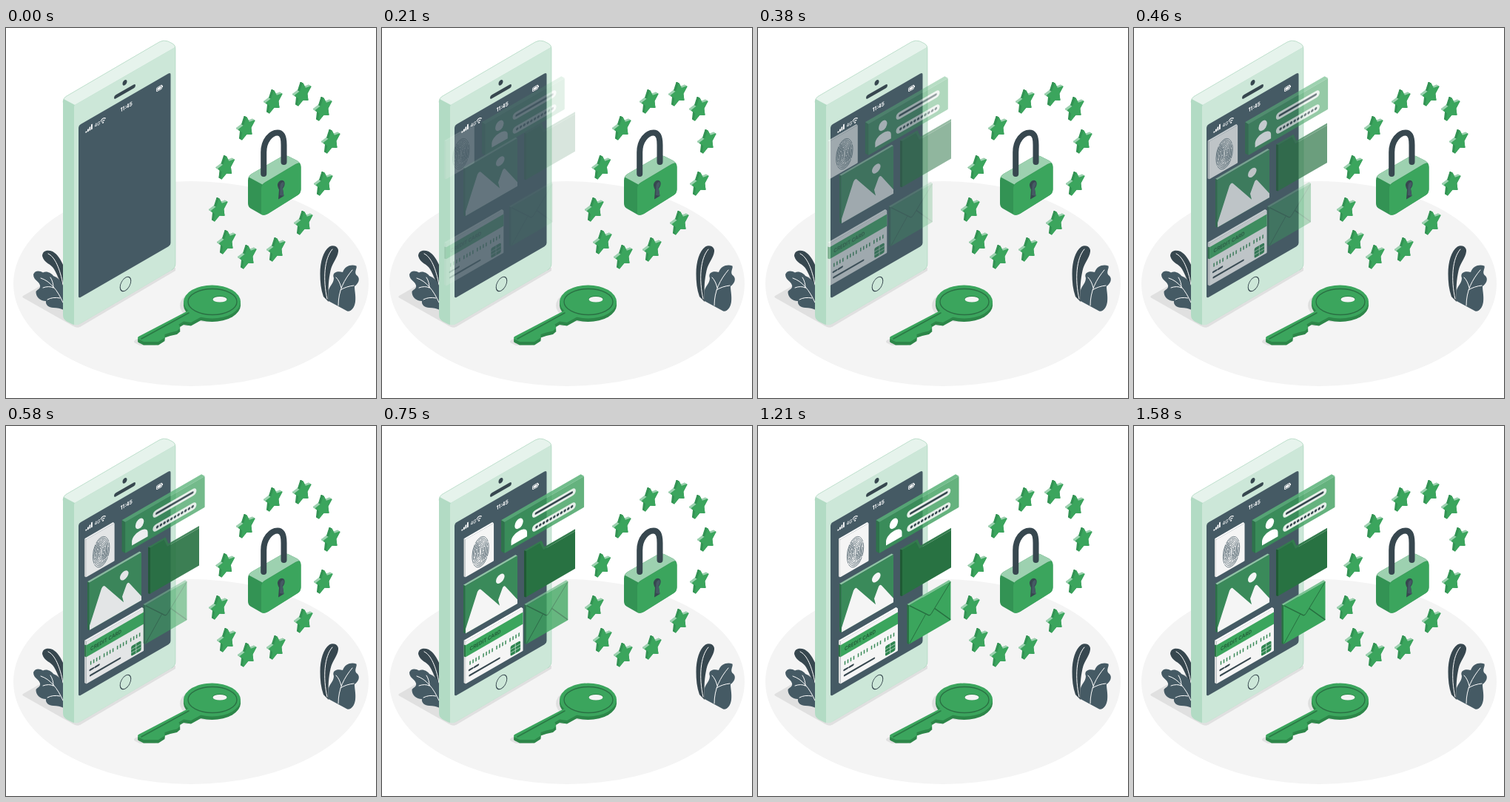
These frames come from a looping animation (500 by 500 pixels, 1.62 s). An HTML page:

```html
<!DOCTYPE html>
<html lang="en">
<head>
<meta charset="utf-8">
<title>Data protection</title>
<style>
  html, body { margin: 0; width: 100%; height: 100%; overflow: hidden; background: #fff; }
  svg { display: block; width: 100vw; height: 100vh; }
  .iso { transform: skewY(-30deg); transform-origin: 0 0; }
  .card { opacity: 0; }
  .line { fill: none; stroke-linecap: round; stroke-linejoin: round; }
  text { font-family: Inter, "Liberation Sans", Arial, sans-serif; font-weight: 700; }
</style>
</head>
<body>
<svg viewBox="0 0 500 500">
  <defs>
    <g id="star"></g>
    <path id="blade" d="M248 381 L179 417 Q177 419 179 420.500 L186 424 H206 L214.500 418.500 V414 L222 411.500 L231 409.500 L235.500 405.500 L233.500 400.500 L240 396.500 L250 398 L268 388Z"/>
    <g id="key"><ellipse cx="278.500" cy="370" rx="38.500" ry="22.500"/><use href="#blade"/></g>
  </defs>

  <ellipse cx="250" cy="345.500" rx="240" ry="138.500" fill="#f4f4f4"/>
  <path d="M23 362 L80 329 L229 324 V328 L100 404 Q96 406 91 403 L24 365 Q21 363.500 23 362Z" fill="#e0e0e0"/>

  <!-- plants -->
  <path d="M49 308 C49 301 56 299 63 302 C70 306 74 313 78 322 V354 C74 345 69 333 65 326 C62 319 51 318 49 308Z" fill="#37474f"/>
  <path d="M37 333 C39 327 46 328 50 330.500 C55 328 61 331 64 335 C70 337 76 343 78 350 V381 C74 379 69 378 64 378 C58 378 53 374 54 369 C46 369 40 363 40.500 356 C43 353 47 352 46 348 C45 342 37 341 37 333Z" fill="#455a64"/>
  <path d="M424.500 332 C424.500 316 429 301 437 295.500 C443 292 450 296 449 302 C448 311 441 317 438.500 328 C436 340 435 350 436 370 L429 363 C425.500 353 424.500 343 424.500 332Z" fill="#37474f"/>
  <path d="M435.500 358 C435 350 443 346 443 338 C440 330 448 328 455 330 C458 321 467 319 473.500 321.500 C475 325 469 331 475 335 C479 339 476 346 471 349 C471 355 473 362 472 370 C471 378 466 384 461 382.500 L436 369 Q435.500 364 435.500 358Z" fill="#455a64"/>
  <path class="line" stroke="#fff" d="M57 305 C66 309 73 325 77 347 M47 338 C60 342 70 355 77 371 M60 337 Q64 343 64 351 M50 351 Q58 348 64 351 M56 367 Q63 363 73 365 M441 299 C430 311 428 340 434 366 M449 375 C449 355 457 340 468 327 M446 337 Q451 342 453 351 M452 354 Q460 349 470 348"/>

  <!-- phone -->
  <path d="M77 100 Q77 95 81 92.500 L207 19 Q213 15.500 219 18 L225 21 Q229 23 229 28 V318 Q229 324 224 327 L103 398 Q97 402.500 90 400.500 L82 396.500 Q77 393.500 77 388Z" fill="#b2dbc4"/>
  <path d="M78 96 Q79 94 81 92.500 L207 19 Q213 15.500 219 18 L225 21 Q228 22.500 228.500 26 L93 104Z" fill="#e6f3ec"/>
  <path d="M93 104 L228.500 26 L229 28 V318 Q229 324 224 327 L103 398 Q97 402.500 92 401 V106Z" fill="#cce7d8"/>
  <path d="M77 100 Q77 95 81 92.500 L207 19 Q213 15.500 219 18 L225 21 Q229 23 229 28 V318 Q229 324 224 327" class="line" stroke="#a9d6bd" stroke-width=".6"/>
  <g class="iso">
    <rect x="98" y="188.300" width="124.500" height="233.700" rx="3" fill="#455a64"/>
    <path class="line" d="M148.500 178.500 H172.500" stroke="#37474f" stroke-width="5"/>
    <ellipse cx="160.500" cy="166.500" rx="3" ry="3.500" fill="#37474f"/>
    <ellipse cx="161.500" cy="439.200" rx="7.300" ry="8.700" fill="none" stroke="#37474f"/>
    <g fill="#fff">
      <path d="M107.500 204 v-2 h1.800 v2z M110 204 v-3.500 h1.800 v3.500z M112.500 204 v-5 h1.800 v5z M115 204 v-7 h1.800 v7z"/>
      <text transform="translate(119.500 203.600) scale(.866 1)" font-size="6.500" style="font-weight:500">4G</text>
      <text transform="translate(154.500 203) scale(.866 1)" font-size="7.600">11:45</text>
      <circle cx="131.200" cy="203.600" r="1"/>
      <path class="line" stroke="#fff" stroke-width="1.100" d="M128 199.700 Q131.200 196 134.400 199.700 M129.500 201.600 Q131.200 199.800 132.900 201.600"/>
      <rect x="203.600" y="198.500" width="7" height="5" rx="1" fill="none" stroke="#fff" stroke-width=".8"/>
      <path d="M204.500 199.500 h5 v3 h-5z M211 200 h1 v2 h-1z"/>
    </g>
  </g>

  <!-- cards -->
  <g class="card" data-dx="-30"><g class="iso" id="print"></g></g>

  <g class="card" data-dy="-30"><g class="iso" id="photo">
    <circle cx="159.800" cy="297" r="5.800" fill="#f5f5f5"/>
    <path d="M113 338 L129 297 Q131.500 293 134 297 L159 333 L157 324 L163 311 Q165 308.500 167 312 L183 338.500 V344 H113Z" fill="#f5f5f5"/>
  </g></g>

  <g class="card" data-dy="-30"><g class="iso" id="folder">
    <path d="M192 277.500 L195 280 H213.500 L218 291.500 H261 V288.500 H219.500 L215.500 277.500Z" fill="#337c4d"/>
    <path d="M192 277.500 L195 280 V342.500 L192 340Z" fill="#1f5a34"/>
    <path d="M195 280 H213.500 L218 291.500 H261 V342 H195Z" fill="#287242"/>
  </g></g>

  <g class="card" data-dx="-30"><g class="iso" id="user">
    <g fill="#fff">
      <ellipse cx="183.500" cy="237.800" rx="5.700" ry="6.500"/>
      <path d="M173 261.500 V256 C173 245 194.500 245 194.500 256 V261.500Z"/>
    </g>
    <path class="line" d="M206 237.300 H255.500 M206 256.200 H255.500" stroke="#e6efe9" stroke-width="9.500"/>
    <path class="line" d="M206.500 237.300 H255" stroke="#37474f" stroke-width="3"/>
    <path class="line" d="M207.500 256.200 H256" stroke="#37474f" stroke-width="3.600" stroke-dasharray="0 4.750"/>
  </g></g>

  <g class="card" data-dx="-30"><g class="iso" id="credit">
    <path d="M109 358.500 L111.500 360.500 V376.500 L109 374.500Z" fill="#2a7544"/>
    <rect x="111.500" y="360.500" width="77.500" height="16" fill="#3ba55d"/>
    <text transform="translate(117 371.500) scale(.866 1)" font-size="7.200" fill="#235f3a">CREDIT CARD</text>
    <path id="digits" stroke="#3a8a58" stroke-width="1.500"/>
    <path d="M116.500 397 h4.500 M123.500 397 h5 M117 404.500 H157" class="line" stroke="#37474f" stroke-width="2.400"/>
    <rect x="172" y="397" width="13.500" height="13.500" rx="2" fill="#2f8550"/>
    <path d="M172 401.500 h13.500 M172 406 h13.500 M178.700 397 v13.500" stroke="#dcebe1" stroke-width=".6"/>
  </g></g>

  <g class="card" data-dx="-30" data-time="1.5"><g class="iso" id="mail">
    <path d="M203 410.500 L225 383.500 M258 410.500 L237 383.500 M203 360 L228.500 387.500 Q230.500 389.500 232.500 387.500 L258 360" class="line" stroke="#276f40" stroke-width="1.100"/>
  </g></g>

  <!-- padlock -->
  <path d="M327 206 Q327 200 332 197 L372 174 Q377 171.500 382 173.500 L393 179 Q398.500 182 398.500 188 V218 Q398.500 223 394 226 L354 251 Q349 254 345 252 L331 244 Q327 242 327 237Z" fill="#339354"/>
  <path d="M345 217 Q345 212 350 209 L391 184.500 Q398.500 180.500 398.500 188 V218 Q398.500 223 394 226 L354 251 Q349 254 345 252Z" fill="#3ba55d"/>
  <path d="M328 201.500 Q329.500 198.500 332 197 L372 174 Q377 171.500 382 173.500 L393 179 Q395.500 180.500 396.500 182.300 Q394 182.300 391 184 L350 208.500 Q347.500 210 346.500 211.500Z" fill="#9dd1b0"/>
  <path class="line" d="M348.200 197 V168 C348.200 152 358 141.500 367 141.500 C374 141.500 375.500 149 375.500 158 V181" stroke="#37474f" stroke-width="8"/>
  <path d="M367 213 C366.500 208 372 204 375 206.500 C378 209 376.500 214 374 217 L375.500 227 L368 231.500 L369 218.500 Q367.500 216 367 213Z" fill="#37474f"/>
  <path d="M370.500 213 Q371 208.500 375 208 Q377 211 373.500 216 L375.500 227 L370 226Z" fill="#455a64"/>

  <g id="stars"></g>

  <!-- key -->
  <use href="#key" x="-5" y="5" fill="#e0e0e0"/>
  <use href="#key" y="4.500" fill="#2d8649"/>
  <use href="#key" y="2.500" fill="#2d8649"/>
  <use href="#key" fill="#3ba55d"/>
  <ellipse cx="279" cy="370" rx="33" ry="17.500" fill="none" stroke="#2a7043" stroke-width="1.300"/>
  <path class="line" d="M183 420 L247 385" stroke="#2a7a45" stroke-width="1.600"/>
  <ellipse cx="289" cy="366.300" rx="10" ry="4.300" fill="#2d8649"/>
  <ellipse cx="289" cy="366.800" rx="9.500" ry="3.800" fill="#f4f4f4"/>
</svg>
<script>
const $ = id => document.getElementById(id);

// Slab with a front face and thin top and left sides of depth d.
function slab(id, x, y, w, h, d, front, top, side) {
  const k = d * 1.155;
  $(id).insertAdjacentHTML('afterbegin',
    `<path d="M${x} ${y}h${w}l${-d} ${-k}h${-w}z" fill="${top}"/>
     <path d="M${x} ${y}v${h}l${-d} ${-k}v${-h}z" fill="${side}"/>
     <rect x="${x}" y="${y}" width="${w}" height="${h}" rx=".8" fill="${front}"/>`);
}
slab('print', 111, 217.5, 38.5, 51, 2, '#f5f5f5', '#fff', '#dcdcdc');
slab('photo', 112.5, 279.5, 70.5, 64.5, 2.5, '#3a8a5a', '#8fc4a4', '#2a7046');
slab('user', 164, 224.6, 107.5, 42, 4.5, 'rgba(55,155,88,.77)', 'rgba(90,178,120,.85)', 'rgba(42,120,70,.85)');
slab('credit', 111.5, 355.5, 77.5, 57.3, 2.5, '#f5f5f5', '#fff', '#dcdcdc');
slab('mail', 202, 359, 56.5, 52.5, 2.5, '#3ba55d', '#7cc294', '#287242');

// Fingerprint: broken concentric rings.
let rings = '';
for (let i = 1; i < 9; i++) {
  rings += `<ellipse cx="131.500" cy="246" rx="${i * 1.4}" ry="${i * 1.9 + 4.5}" fill="none"
    stroke="#455a64" stroke-width=".65" stroke-dasharray="${9 + i * 2} 1.3" stroke-dashoffset="${i * 5}"/>`;
}
$('print').insertAdjacentHTML('beforeend', rings);

let ticks = '';
for (let i = 0; i < 16; i++) ticks += `M${117.5 + i * 4 + (i >> 2) * 2} 385.500v5`;
$('digits').setAttribute('d', ticks);

// Extruded star: sides that face up are light, the others dark.
const pts = Array.from({ length: 10 }, (_, i) => {
  const a = i * Math.PI / 5, r = i % 2 ? 7.2 : 14, x = r * Math.sin(a) * 0.78;
  return [x + 1.2, -r * Math.cos(a) - 0.577 * x + 1.5];
});
const ex = -3, ey = -1.7;
const sides = pts.map(([x, y], i) => {
  const [u, v] = pts[(i + 1) % 10], dx = u - x, dy = v - y;
  const seen = dy * ex - dx * ey > 0;
  const color = seen && dx / Math.hypot(dx, dy) > 0.6 ? '#9dd1b0' : '#339354';
  return { seen, svg: `<path d="M${x} ${y}L${u} ${v}l${ex} ${ey}L${x + ex} ${y + ey}z" fill="${color}" stroke="${color}"/>` };
});
sides.sort((a, b) => a.seen - b.seen);
$('star').innerHTML = `<g stroke-linejoin="round" stroke-width="1.600">${sides.map(s => s.svg).join('')}
  <polygon points="${pts.join(' ')}" fill="#3ba55d" stroke="#3ba55d"/></g>`;
$('stars').innerHTML = [[400, 88], [428, 108], [439, 152], [429, 209], [402, 262], [365, 298],
  [326, 308], [298, 288], [287, 244], [296.5, 187], [324, 134], [361, 98]]
  .map(([x, y]) => `<use href="#star" x="${x}" y="${y}"/>`).join('');

// cubic-bezier(.36, -.01, .5, 1.38)
const curve = (a, b, s) => 3 * a * s * (1 - s) ** 2 + 3 * b * s * s * (1 - s) + s ** 3;
function ease(t) {
  if (t <= 0 || t >= 1) return t <= 0 ? 0 : 1;
  let lo = 0, hi = 1;
  for (let i = 0; i < 24; i++) {
    const mid = (lo + hi) / 2;
    if (curve(0.36, 0.5, mid) < t) lo = mid; else hi = mid;
  }
  return curve(-0.01, 1.38, lo);
}

const LOOP = 1620, FPS = 24;
const cards = [...document.querySelectorAll('.card')];
const start = performance.now();
function draw(now) {
  const ms = Math.max(0, now - start) % LOOP;
  const step = Math.floor((ms + 4) * FPS / 1000);
  const t = step < 3 ? 0 : step / FPS + 0.0125;
  for (const card of cards) {
    const { dx = 0, dy = 0, time = 1 } = card.dataset;
    const p = ease(t / time);
    card.style.opacity = Math.max(0, Math.min(1, p));
    card.setAttribute('transform', `translate(${dx * (1 - p)} ${dy * (1 - p)})`);
  }
  requestAnimationFrame(draw);
}
draw(start);
</script>
</body>
</html>
```
